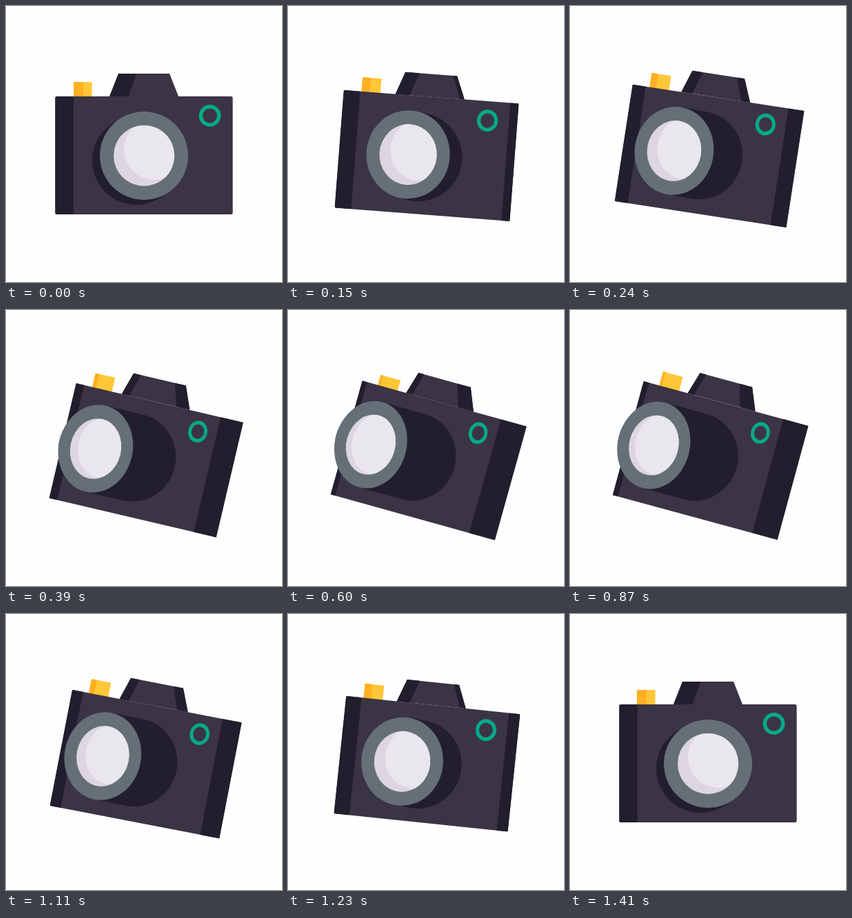
Write an HTML page that moves like this. It is 400 by 400 pixels and loops after 3.47 s.

```html
<!DOCTYPE html>
<html lang="en">
<head>
<meta charset="utf-8">
<title>Camera</title>
<style>
  html, body { margin: 0; width: 100%; height: 100%; overflow: hidden; background: #fefefe; }
  svg { display: block; width: 100%; height: 100%; }
</style>
</head>
<body>
<svg viewBox="0 0 400 400">
  <g id="camera">
    <rect id="button" fill="#ffc638"/>
    <rect id="buttonSide" fill="#ffaf22"/>
    <polygon id="hump" fill="#3b3445"/>
    <polygon id="humpLeft" fill="#231e2d"/>
    <polygon id="humpRight" fill="#231e2d"/>
    <rect id="body" y="-85.5" height="171" fill="#3b3445"/>
    <rect id="sideLeft" y="-85.5" height="171" fill="#231e2d"/>
    <rect id="sideRight" y="-85.5" height="171" fill="#231e2d"/>
    <line id="barrel" stroke="#231e2d" stroke-width="128" stroke-linecap="round"/>
    <ellipse id="rim" cy=".4" ry="64" fill="#656f78"/>
    <ellipse id="glass" cy=".4" ry="44" fill="#ddd6e2"/>
    <clipPath id="glassClip"><ellipse id="glassEdge" cy=".4" ry="44"/></clipPath>
    <ellipse id="shine" ry="44" fill="#eae6ed" clip-path="url(#glassClip)"/>
  </g>
  <g fill="#07a988" fill-opacity=".2">
    <ellipse id="glow" cx="188" cy="200.7" rx="158" ry="156.5"/>
    <ellipse id="halo" cx="259.5" cy="176.5" rx="46.5" ry="48.5"/>
  </g>
  <g id="lampLayer">
    <circle id="lamp" r="13.2" stroke="#07a988" stroke-width="5.4"/>
  </g>
</svg>
<script>
const LOOP = 3470, MOVE = 1410, STEP = 30;
const TOP = -85.5, HUMP_TOP = -118.5;

const el = {};
document.querySelectorAll('svg [id]').forEach(node => el[node.id] = node);

function set(id, attrs) {
  for (const key in attrs) el[id].setAttribute(key, attrs[key]);
}

// cubic-bezier(.25, 0, .25, 1)
function ease(x) {
  let lo = 0, hi = 1;
  for (let i = 0; i < 24; i++) {
    const s = (lo + hi) / 2;
    if (0.75 * s * (1 - s) + s ** 3 < x) lo = s; else hi = s;
  }
  return lo * lo * (3 - 2 * lo);
}

function trapezoid(id, topL, topR, baseL, baseR) {
  set(id, { points: `${topL},${HUMP_TOP} ${topR},${HUMP_TOP} ${baseR},${TOP} ${baseL},${TOP}` });
}

function between(t, from, to) {
  return t >= from && t < to;
}

function drawButton(p, t) {
  const press = between(t, 510, 690) ? 5.5 * Math.sin((t - 510) / 180 * Math.PI) : 0;
  const x = -102 + 2 * p - (t >= MOVE ? 1 : 0);
  const box = { x, y: -106.3 + press, height: 22 - press };
  set('button', { ...box, width: 26.5 + 3.3 * p });
  set('buttonSide', { ...box, width: 14 - 5 * p - 6 * p * p });
}

function drawBody(p) {
  const half = 128.6 - 5.2 * p;
  const left = 26.5 - 5 * p - 15 * p * p;
  const right = 45 * p - 6 * p * p;
  const rx = 2.5 * (1 - p);
  set('body', { x: -half, width: 2 * half, rx });
  set('sideLeft', { x: -half, width: left, rx });
  set('sideRight', { x: half - right, width: right });

  const topL = -37 - 11.3 * p, topR = 37 - 6.8 * p;
  const baseL = -50 - 7.8 * p, baseR = 50 - 6.3 * p;
  const shade = 26.5 - 24 * p + 6 * p * p;
  trapezoid('hump', topL, topR, baseL, baseR);
  trapezoid('humpLeft', topL, topL + shade, baseL, baseL + shade + 0.7);
  trapezoid('humpRight', topR - 20 * p, topR, baseR - 23.5 * p, baseR);
}

function drawLens(p) {
  const cx = -100 * p + 12 * p * p;
  const rx = 64 - 12.3 * p;
  const glassRx = 44 - 8.7 * p;
  const baseRx = 64 - 2 * p;
  const k = baseRx / 64;
  set('barrel', {
    transform: `scale(${k} 1)`,
    x1: (-11 - 12.6 * p * p) / k, y1: 0.5 + 7 * (1 - p) ** 3,
    x2: (cx + baseRx - rx) / k, y2: 0.4
  });
  set('rim', { cx, rx });
  set('glass', { cx, rx: glassRx });
  set('glassEdge', { cx, rx: glassRx });
  set('shine', { cx: cx + 15 + 6 * p - 13.5 * p * p, cy: -8.6 + 6 * p, rx: glassRx });
}

function drawLight(p, t, pose) {
  const x = 95.5 - 43.5 * p + 6 * p * p;
  set('lampLayer', { transform: pose });
  set('lamp', {
    transform: `translate(${x} -57.5) scale(${1 - 0.15 * p} 1)`,
    fill: between(t, 630, 810) ? '#07a988' : 'none'
  });
  set('halo', { visibility: between(t, 660, 780) ? 'visible' : 'hidden' });
  set('glow', { visibility: between(t, 690, 750) ? 'visible' : 'hidden' });
}

function draw(t) {
  const p = t < MOVE ? ease(1 - Math.abs(2 * t / MOVE - 1)) : 0;
  const pose = `translate(${200 + 3.8 * p} ${216.5 + 1.6 * p}) rotate(${15.8 * p})`;
  set('camera', { transform: pose });
  drawButton(p, t);
  drawBody(p);
  drawLens(p);
  drawLight(p, t, pose);
}

const start = performance.now();
function tick() {
  const t = (performance.now() - start) % LOOP;
  draw(Math.floor(t / STEP) * STEP);
  requestAnimationFrame(tick);
}
tick();
</script>
</body>
</html>
```
